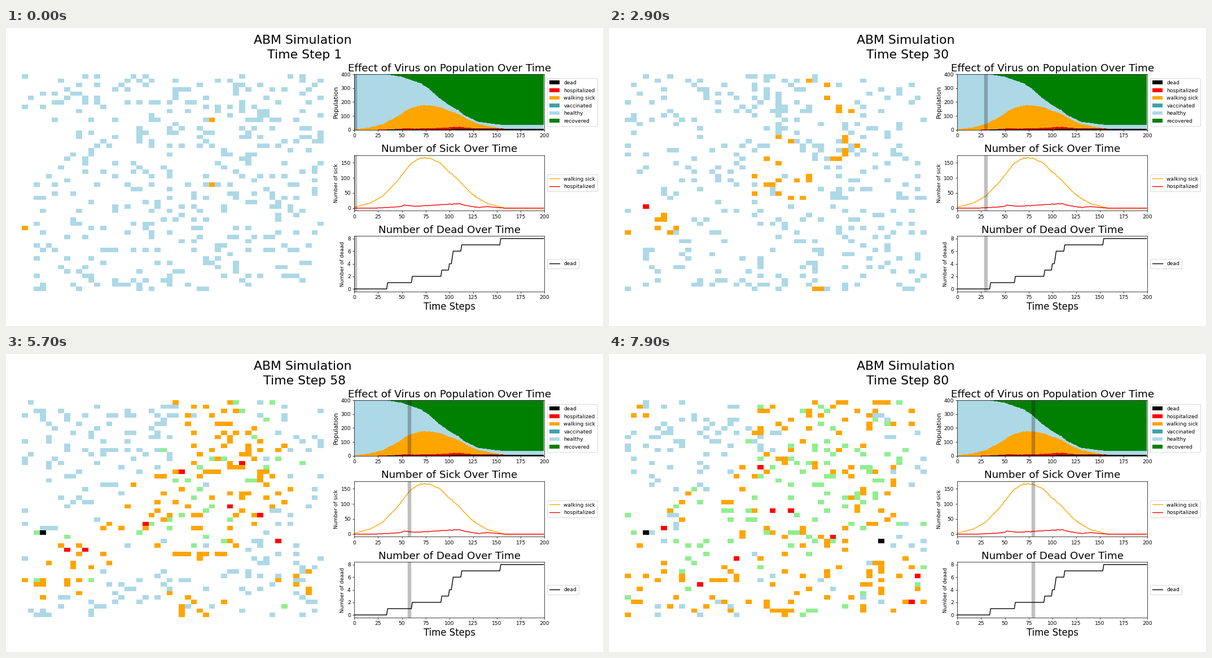
These frames come from a looping animation (1058x529 px, 8000 ms). A matplotlib script:

```python
import matplotlib.pyplot as plt
import numpy as np
from matplotlib.animation import FuncAnimation

W, H = 1058, 529
N, AGENTS, STEPS = 50, 400, 80
STAY = 11
HEALTHY, RECOVERED, SICK, HOSPITAL, DEAD = range(5)
CELL_COLORS = np.array([(173, 216, 230), (144, 238, 144), (255, 165, 0),
                        (255, 0, 0), (0, 0, 0)], dtype=np.uint8)

rng = np.random.default_rng(7)
t = np.arange(200)


def curve(*points, noise=0.0):
    """Whole-number counts through key points, rough in the middle."""
    xs, ys = zip(*points)
    rough = rng.normal(0, noise, t.size) * ((t > 45) & (t < 135))
    return np.round(np.interp(t, xs, ys) + rough).astype(int)


walking = curve((0, 3), (17, 17), (30, 40), (45, 89), (60, 149), (70, 167),
                (80, 165), (90, 150), (100, 120), (110, 92), (120, 58),
                (130, 33), (140, 15), (158, 0), noise=1.2)
hospital = curve((22, 0), (45, 4), (53, 10), (63, 6), (80, 9), (110, 15),
                 (118, 8), (130, 2), (140, 5), (158, 0), noise=0.5)
not_recovered = curve((34, 400), (50, 382), (70, 334), (77, 304), (90, 226),
                      (100, 176), (110, 139), (115, 107), (130, 58), (157, 33))
dead = np.searchsorted([35, 61, 92, 100, 103, 104, 113, 154], t, side="right")

# Fatal cases: cell, step of admission, step of death
FATAL = [((3, 30), 25, 35), ((42, 32), 49, 61)]


def distance(a, b):
    """Distance on a grid whose edges wrap around."""
    d = np.abs(a - b)
    return np.hypot(*np.moveaxis(np.minimum(d, N - d), -1, 0))


def paint(pos, state):
    grid = np.full((N, N, 3), 255, dtype=np.uint8)
    for kind, color in enumerate(CELL_COLORS):
        x, y = pos[state == kind].T
        grid[y, x] = color
    return grid


def simulate():
    """Random walkers whose states follow the population counts."""
    pos = rng.integers(0, N, (AGENTS, 2))
    state = np.full(AGENTS, HEALTHY)
    since = np.zeros(AGENTS, dtype=int)
    pos[:3] = (31, 10), (31, 25), (0, 35)
    state[:3] = SICK
    doomed = {}
    grids = [paint(pos, state)]

    def having(kind):
        return np.flatnonzero(state == kind)

    def change(who, kind, step):
        state[who], since[who] = kind, step

    for step in range(2, STEPS + 1):
        mobile = state < HOSPITAL
        moves = rng.integers(-1, 2, (AGENTS, 2))
        pos[mobile] = (pos[mobile] + moves[mobile]) % N

        for cell, admitted, died in FATAL:
            if step == admitted:
                sick = having(SICK)
                doomed[cell] = who = sick[distance(pos[sick], cell).argmin()]
                pos[who] = cell
                change(who, HOSPITAL, step)
            elif step == died:
                change(doomed[cell], DEAD, step)

        patients = np.setdiff1d(having(HOSPITAL), list(doomed.values()))
        change(patients[since[patients] <= step - STAY], RECOVERED, step)
        beds = max(hospital[step] - having(HOSPITAL).size, 0)
        change(rng.choice(having(SICK), beds, replace=False), HOSPITAL, step)

        sick = having(SICK)
        cured = AGENTS - not_recovered[step] - having(RECOVERED).size
        oldest = sick[np.argsort(since[sick], kind="stable")]
        change(oldest[:max(cured, 0)], RECOVERED, step)

        # Those nearest to a sick agent catch the virus
        sick, healthy = having(SICK), having(HEALTHY)
        reach = distance(pos[healthy][:, None], pos[sick][None]).min(axis=1)
        reach += rng.random(healthy.size) * 3
        caught = max(walking[step] - sick.size, 0)
        change(healthy[np.argsort(reach)[:caught]], SICK, step)

        grids.append(paint(pos, state))
    return grids


grids = simulate()
fig = plt.figure(figsize=(16, 8), dpi=W / 16, facecolor="white")


def add_axes(left, top, right, bottom):
    return fig.add_axes([left / W, 1 - bottom / H,
                         (right - left) / W, (bottom - top) / H])


def heading(x, baseline, text):
    return fig.text(x / W, 1 - baseline / H, text, size=24, ha="center")


heading(526, 28, "ABM Simulation")
counter = heading(529, 53.6, "Time Step 1")

field = add_axes(28, 82, 562, 467)
field.axis("off")
image = field.imshow(grids[0], aspect="auto", interpolation="nearest")

ax_pop, ax_sick, ax_dead = (
    add_axes(617.3, top, 954.3, top + 98.4) for top in (82.2, 225.8, 369.3))

healthy_count = np.maximum(not_recovered - dead - hospital - walking, 0)
layers = [("dead", "black", dead),
          ("hospitalized", "red", hospital),
          ("walking sick", "orange", walking),
          ("vaccinated", "#41a1ab", 0 * t),
          ("healthy", "lightblue", healthy_count),
          ("recovered", "green", AGENTS - not_recovered)]
base = 0 * t
for name, color, count in layers:
    ax_pop.stairs(base + count, np.arange(201) - 0.5, baseline=base,
                  fill=True, color=color, label=name)
    base = base + count

ax_sick.plot(t, walking, color="orange", label="walking sick")
ax_sick.plot(t, hospital, color="red", label="hospitalized")
ax_dead.plot(t, dead, color="black", label="dead")

ax_pop.set_ylim(0, 400)
ax_pop.set_yticks(range(0, 401, 100))
ax_sick.set_ylim(-8.35, 175.35)
ax_sick.set_yticks(range(0, 151, 50))
ax_dead.set_ylim(-0.4, 8.4)
ax_dead.set_yticks(range(0, 9, 2))
ax_dead.set_xlabel("Time Steps", size=18, labelpad=3)

markers = []
for ax, title, label, size in (
        (ax_pop, "Effect of Virus on Population Over Time", "Population", 12),
        (ax_sick, "Number of Sick Over Time", "Number of sick", 10),
        (ax_dead, "Number of Dead Over Time", "Number of deaad", 10)):
    ax.set_title(title, size=20)
    ax.set_ylabel(label, size=size)
    ax.set_xlim(0, 200)
    ax.set_xticks(range(0, 201, 25))
    ax.legend(loc="center left", bbox_to_anchor=(1, 0.5))
    markers.append(ax.axvline(1, color="black", alpha=0.25, lw=7))


def update(i):
    step = i + 1
    counter.set_text(f"Time Step {step}")
    image.set_data(grids[i])
    for marker in markers:
        marker.set_xdata([step, step])
    return [counter, image, *markers]


anim = FuncAnimation(fig, update, frames=STEPS, interval=100,
                     repeat=True, repeat_delay=0, blit=False)
plt.show()
```
